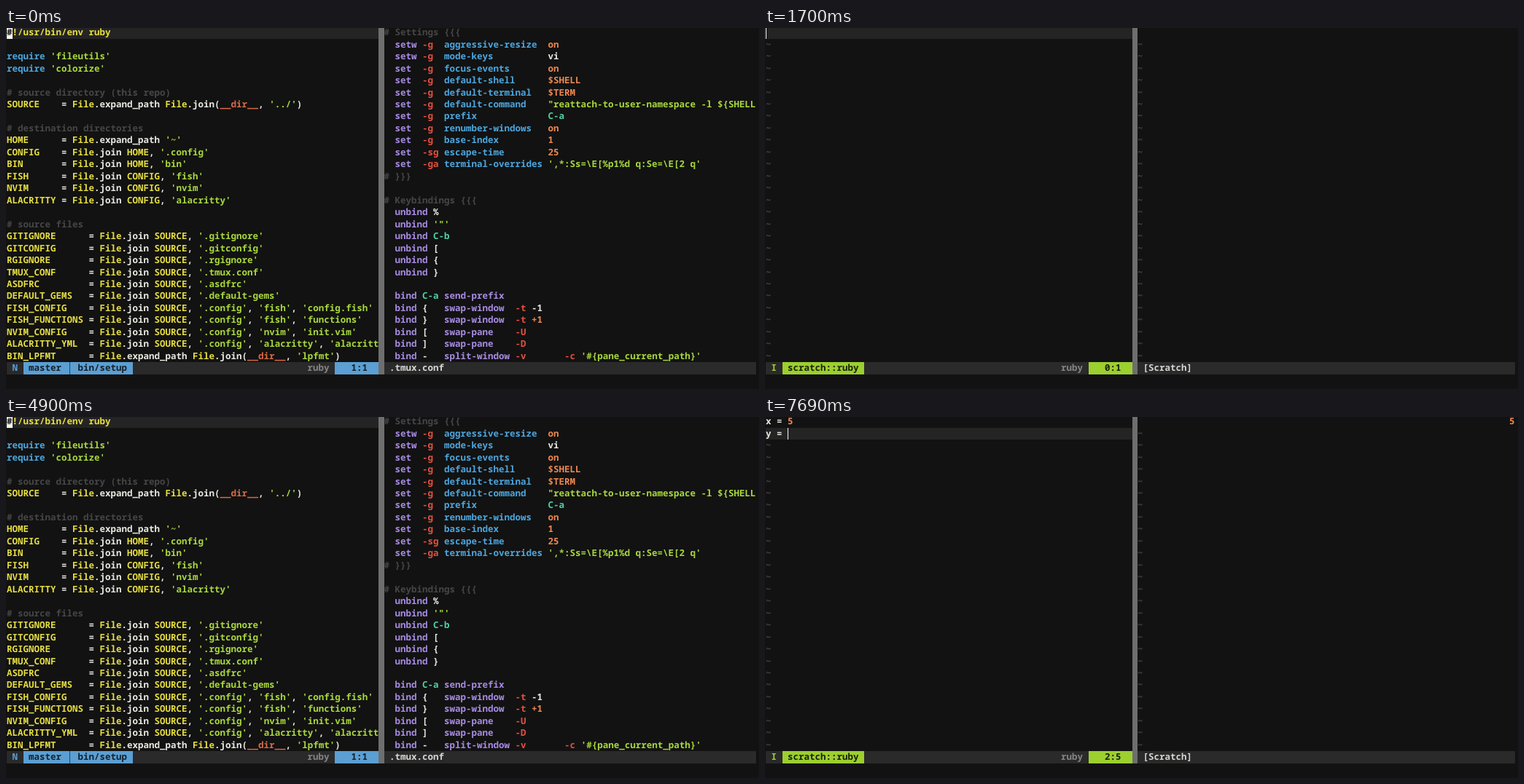
Recreate the animation shown at these times as an HTML page. Size 1033 px wide and 496 px high, loop 8 s.

```html
<!DOCTYPE html>
<html lang="en">
<head>
<meta charset="utf-8">
<title>Scratch buffer demo</title>
<style>
  :root { --cw: 7.5px; --rh: 16.47px; --accent: #5b9fd3; }
  html, body { margin: 0; width: 100%; height: 100%; overflow: hidden; background: #121212; }
  #stage {
    position: absolute; left: 0; top: 0; width: 1033px; height: 496px; overflow: hidden;
    font: 700 12.5px/var(--rh) "Noto Sans Mono", "DejaVu Sans Mono", monospace;
    color: #e8e8e2; white-space: pre;
    text-rendering: geometricPrecision; font-variant-ligatures: none;
  }
  #stage.insert { --accent: #9ccf2f; }
  .view { position: absolute; inset: 0; visibility: hidden; }
  .code #code, .scratch #scratch { visibility: visible; }

  /* --c column, --r row, --w width in cells */
  .at {
    position: absolute; box-sizing: border-box; margin: 0; font: inherit; overflow: hidden;
    left: calc(1px + var(--c, 0) * var(--cw));
    top: calc(-1.85px + var(--r, 0) * var(--rh));
    width: calc(var(--w) * var(--cw)); height: calc(var(--h, 1) * var(--rh));
  }
  pre.at { --h: 28; }
  .status { --r: 28; }
  .bar { background: #2a2a2a; }
  .line { background: #242424; }
  .split { --h: 29; --w: 1; background: #6e6e6e; }
  .fill { background: var(--accent); color: #16222b; }
  .insert .fill { color: #1a2208; }
  .mode { color: var(--accent); }
  .type { color: #858585; }
  .name { color: #d6d6d2; }
  .block { --w: 1; background: #f4f4f0; color: #121212; }
  .insert .block { width: 1.3px; color: transparent; }
  .rule { position: absolute; left: 87px; top: 459.3px; width: 1.2px; height: 16.5px; background: #23465f; }

  .comment { color: #464646; }
  .tilde { color: #5a5a5a; font-weight: 400; }
  .const { color: #e6de42; }
  .string { color: #a8d83c; }
  .func { color: #4ca6de; }
  .self { color: #dc6a45; }
  .cmd { color: #a78be2; }
  .flag { color: #e5503f; }
  .value { color: #ee8850; }
  .key { color: #4fd3a4; }
</style>
</head>
<body>
<div id="stage">
  <div class="view" id="code">
    <div class="at line" style="--w:68"></div>
    <pre class="at" id="ruby" style="--w:68">#!/usr/bin/env ruby

require 'fileutils'
require 'colorize'

# source directory (this repo)
SOURCE    = File.expand_path File.join(__dir__, '../')

# destination directories
HOME      = File.expand_path '~'
CONFIG    = File.join HOME, '.config'
BIN       = File.join HOME, 'bin'
FISH      = File.join CONFIG, 'fish'
NVIM      = File.join CONFIG, 'nvim'
ALACRITTY = File.join CONFIG, 'alacritty'

# source files
GITIGNORE      = File.join SOURCE, '.gitignore'
GITCONFIG      = File.join SOURCE, '.gitconfig'
RGIGNORE       = File.join SOURCE, '.rgignore'
TMUX_CONF      = File.join SOURCE, '.tmux.conf'
ASDFRC         = File.join SOURCE, '.asdfrc'
DEFAULT_GEMS   = File.join SOURCE, '.default-gems'
FISH_CONFIG    = File.join SOURCE, '.config', 'fish', 'config.fish'
FISH_FUNCTIONS = File.join SOURCE, '.config', 'fish', 'functions'
NVIM_CONFIG    = File.join SOURCE, '.config', 'nvim', 'init.vim'
ALACRITTY_YML  = File.join SOURCE, '.config', 'alacritty', 'alacritt
BIN_LPFMT      = File.expand_path File.join(__dir__, 'lpfmt')</pre>
    <div class="at block">#</div>
    <pre class="at" id="tmux" style="--c:69;--w:68"># Settings {{{
  setw -g  aggressive-resize  on
  setw -g  mode-keys          vi
  set  -g  focus-events       on
  set  -g  default-shell      $SHELL
  set  -g  default-terminal   $TERM
  set  -g  default-command    "reattach-to-user-namespace -l ${SHELL
  set  -g  prefix             C-a
  set  -g  renumber-windows   on
  set  -g  base-index         1
  set  -sg escape-time        25
  set  -ga terminal-overrides ',*:Ss=\E[%p1%d q:Se=\E[2 q'
# }}}

# Keybindings {{{
  unbind %
  unbind '"'
  unbind C-b
  unbind [
  unbind {
  unbind }

  bind C-a send-prefix
  bind {   swap-window  -t -1
  bind }   swap-window  -t +1
  bind [   swap-pane    -U
  bind ]   swap-pane    -D
  bind -   split-window -v       -c '#{pane_current_path}'</pre>
    <div class="at status bar" style="--w:137"></div>
    <div class="at split" style="--c:68"></div>
    <div class="at status mode" style="--c:1;--w:1">N</div>
    <div class="at status fill" style="--c:3;--w:20"> master   bin/setup</div>
    <div class="rule"></div>
    <div class="at status type" style="--c:55;--w:5">ruby</div>
    <div class="at status fill" style="--c:60;--w:8">   1:1</div>
    <div class="at status name" style="--c:70;--w:12">.tmux.conf</div>
  </div>

  <div class="view" id="scratch">
    <div class="at line" id="cursorLine" style="--w:67"></div>
    <pre class="at" id="left" style="--w:67"></pre>
    <pre class="at" id="right" style="--c:68;--w:69"></pre>
    <div class="at value" id="result" style="--c:136;--w:1">5</div>
    <div class="at block" id="cursor"></div>
    <div class="at status bar" style="--w:137"></div>
    <div class="at split" style="--c:67"></div>
    <div class="at status mode" id="mode" style="--c:1;--w:1"></div>
    <div class="at status fill" style="--c:3;--w:15"> scratch::ruby</div>
    <div class="at status type" style="--c:54;--w:5">ruby</div>
    <div class="at status fill" id="pos" style="--c:59;--w:8"></div>
    <div class="at status name" style="--c:69;--w:10">[Scratch]</div>
  </div>

  <div class="at" id="keys" style="--c:126;--r:29;--w:5">&lt;20&gt;</div>
</div>

<script>
  const $ = id => document.getElementById(id);
  const stage = $('stage');
  const span = (cls, text) => `<span class="${cls}">${text}</span>`;

  // Wraps every match of a rule's named groups in a span of that class.
  function highlight(text, rule) {
    return text.replace(rule, (...args) => {
      const found = Object.entries(args.at(-1)).find(([, v]) => v !== undefined);
      return found ? span(found[0], args[0]) : args[0];
    });
  }

  const rubyRule = /(?<const>#!.*|\b[A-Z][A-Z_]+\b|\bFile\b)|(?<comment>#.*)|(?<string>'[^'\n]*'?)|(?<self>__dir__)|(?<func>require)/g;
  const tmuxRule = /(?<comment>^#.*)|(?<string>'[^'\n]*'|".*)|(?<cmd>\b(?:setw?|(?:un)?bind|send-prefix|swap-\w+|split-window)(?![\w-]))|(?<key>C-\w)|(?<value>\$\w+|\bon\b|\+1|(?<!-)\b\d+)|(?<func>\b(?!vi\b)[a-z][\w-]+)|(?<flag>-[a-zA-Z]+)/gm;

  for (const [id, rule] of [['ruby', rubyRule], ['tmux', tmuxRule]]) {
    $(id).innerHTML = highlight($(id).textContent, rule);
  }

  const tildes = n => span('tilde', Array(n).fill('~').join('\n'));
  $('right').innerHTML = '\n' + tildes(27);

  const LOOP = 8000;
  const steps = [
    { at: 0, view: 'code' },
    { at: 500, view: 'code', keys: true },
    { at: 700, text: '' },
    { at: 1700, text: '', insert: true },
    { at: 2900, text: 'x ', insert: true },
    { at: 3100, text: 'x =', insert: true },
    { at: 3300, text: 'x = ', insert: true },
    { at: 3500, text: 'x = 5', insert: true },
    { at: 3900, text: 'x = 5', insert: true, result: true },
    { at: 4100, text: 'x = 5', result: true },
    { at: 4700, text: 'x = 5', result: true, keys: true },
    { at: 4900, view: 'code' },
    { at: 5700, text: 'x = 5', result: true },
    { at: 6290, text: 'x = 5', insert: true, result: true },
    { at: 6490, text: 'x = 5\n', insert: true, result: true },
    { at: 7290, text: 'x = 5\ny', insert: true, result: true },
    { at: 7490, text: 'x = 5\ny ', insert: true, result: true },
    { at: 7690, text: 'x = 5\ny = ', insert: true, result: true }
  ];

  function show({ view = 'scratch', text = '', insert, result, keys }) {
    const lines = text.split('\n');
    const row = lines.length - 1;
    const last = lines[row];
    const col = insert ? last.length : Math.max(0, last.length - 1);

    stage.className = view + (insert ? ' insert' : '');
    $('keys').hidden = !keys;
    $('result').hidden = !result;
    $('left').innerHTML = highlight(text, /(?<value>\d)/g) + '\n' + tildes(27 - row);
    $('cursorLine').style.setProperty('--r', row);
    $('cursor').style.setProperty('--r', row);
    $('cursor').style.setProperty('--c', col);
    $('cursor').textContent = insert ? '' : last[col] || '';
    $('mode').textContent = insert ? 'I' : 'N';
    $('pos').textContent = `   ${text ? row + 1 : 0}:${col + 1}`;
  }

  let current;
  function tick() {
    const t = performance.now() % LOOP;
    const step = steps.findLast(s => s.at <= t);
    if (step !== current) show(current = step);
    requestAnimationFrame(tick);
  }
  tick();
</script>
</body>
</html>
```
